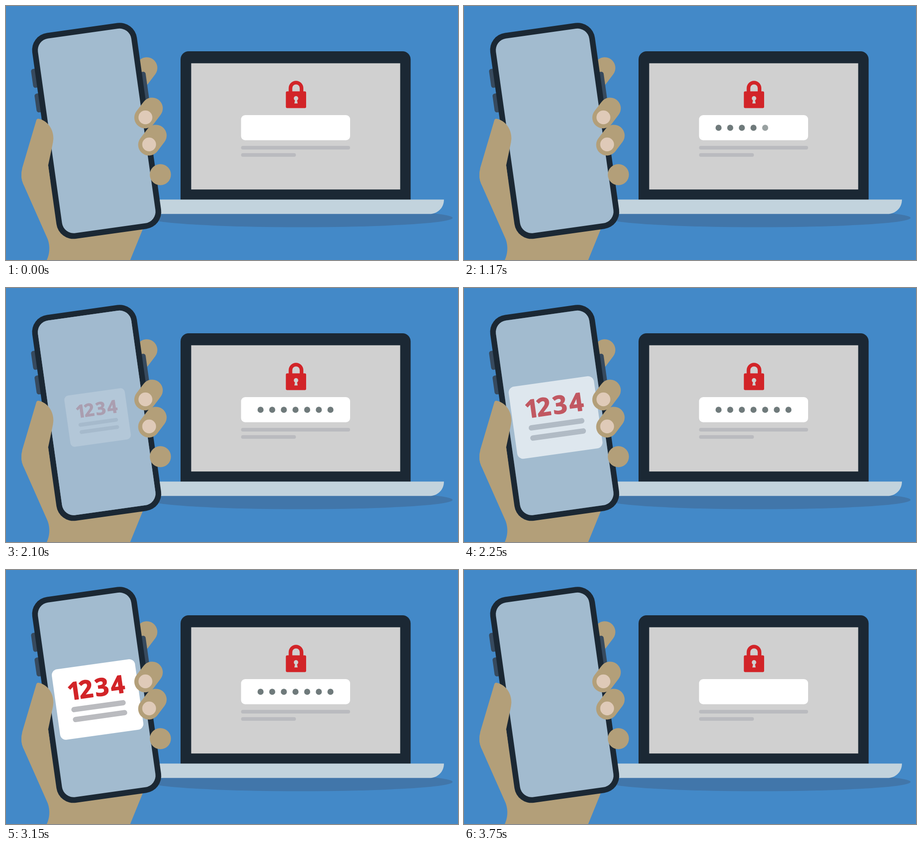
Write an HTML page with a canvas that moves like this. It is 997x561 px and loops after 3.78 s.

```html
<!DOCTYPE html>
<html lang="en">
<head>
<meta charset="utf-8">
<title>Passcode on phone</title>
<style>
  html, body { margin: 0; width: 100%; height: 100%; overflow: hidden; background: #4389c8; }
  canvas { display: block; }
</style>
</head>
<body>
<canvas id="stage" width="997" height="561"></canvas>
<script>
const ctx = document.getElementById('stage').getContext('2d');
const LOOP = 3780;
const TILT = -8 * Math.PI / 180;
const COLOR = {
  sky: '#4389c8', shadow: '#4176aa', dark: '#1b2834', base: '#c2d3dd', screen: '#d0d0d0',
  red: '#d22428', line: '#babbbf', dot: '#6f7a7b', skin: '#b39f79', nail: '#dfcab8',
  glass: '#a2bbcf', button: '#374a5e'
};

const clamp = v => Math.min(1, Math.max(0, v));
const progress = (t, start, length) => clamp((t - start) / length);
const backOut = p => 1 + 2.70158 * (p - 1) ** 3 + 1.70158 * (p - 1) ** 2;

function box(x, y, w, h, r, color) {
  ctx.fillStyle = color;
  ctx.beginPath();
  ctx.roundRect(x, y, w, h, r);
  ctx.fill();
}

const centeredBox = (x, y, w, h, r, color) => box(x - w / 2, y - h / 2, w, h, r, color);

function disc(x, y, r, color) {
  ctx.fillStyle = color;
  ctx.beginPath();
  ctx.arc(x, y, r, 0, 2 * Math.PI);
  ctx.fill();
}

function shape(path, color) {
  ctx.fillStyle = color;
  ctx.fill(new Path2D(path));
}

function finger(x, y) {
  ctx.strokeStyle = COLOR.skin;
  ctx.lineWidth = 47.2;
  ctx.lineCap = 'round';
  ctx.beginPath();
  ctx.moveTo(x, y);
  ctx.lineTo(x - 15.7, y + 20.6);
  ctx.stroke();
}

function tilted(x, y, draw) {
  ctx.save();
  ctx.translate(x, y);
  ctx.rotate(TILT);
  draw();
  ctx.restore();
}

function drawLock() {
  box(617.3, 188.5, 44.7, 37, 3, COLOR.red);
  ctx.strokeStyle = COLOR.red;
  ctx.lineWidth = 8;
  ctx.lineCap = 'butt';
  ctx.beginPath();
  ctx.moveTo(627.5, 190);
  ctx.arc(639.7, 181.4, 12.2, Math.PI, 0);
  ctx.lineTo(651.9, 190);
  ctx.stroke();
  disc(639.7, 204, 4.9, COLOR.screen);
  shape('M638 206 L636 215.3 H643.4 L641.4 206 Z', COLOR.screen);
}

function drawLaptop(dotsOut, t) {
  ctx.fillStyle = COLOR.shadow;
  ctx.beginPath();
  ctx.ellipse(650, 468, 335, 20.6, 0, 0, 2 * Math.PI);
  ctx.fill();
  box(385, 100, 507.5, 328, [18, 18, 0, 0], COLOR.dark);
  box(408.5, 126.5, 461, 278.7, 0, COLOR.screen);
  shape('M300 427.5 H966 C966 446 952 459.3 934 459.3 H300 Z', COLOR.base);
  drawLock();
  box(518.5, 241, 240.5, 55.5, 9, '#fff');
  box(518.5, 309, 240.5, 8, 4, COLOR.line);
  box(518.5, 325, 121, 8, 4, COLOR.line);
  for (let i = 0; i < 7; i++) {
    ctx.globalAlpha = progress(t, 220 + 220 * i, 100) * dotsOut;
    disc(561.5 + 25.7 * i, 269, 6.7, COLOR.dot);
  }
  ctx.globalAlpha = 1;
}

function drawCard(scale) {
  ctx.save();
  ctx.scale(scale, scale);
  centeredBox(0, 0, 185.3, 157.1, 13, '#fff');
  ctx.font = '700 54px "Open Sans", "Noto Sans", sans-serif';
  ctx.textAlign = 'center';
  ctx.lineJoin = 'round';
  ctx.lineWidth = 1.5;
  ctx.fillStyle = ctx.strokeStyle = COLOR.red;
  [-48.2, -22.5, 12.8, 48.3].forEach((x, i) => {
    ctx.fillText(i + 1, x, -7);
    ctx.strokeText(i + 1, x, -7);
  });
  centeredBox(0, 14.9, 121, 11.6, 5.8, COLOR.line);
  centeredBox(0.3, 37.1, 121, 11.6, 5.8, COLOR.line);
  ctx.restore();
}

const drawGlass = () => centeredBox(0, 0, 208, 434, 26, COLOR.glass);

function drawPhone(cardAlpha, cardScale) {
  tilted(200, 275.8, () => {
    box(-125, -155, 20, 42, 5, COLOR.button);
    box(-125, -100, 20, 42, 5, COLOR.button);
    box(104, -115, 20.5, 70, 5, COLOR.button);
    centeredBox(0, 0, 233, 459, 38, COLOR.dark);
    drawGlass();
  });
  if (cardAlpha === 0) return;
  tilted(202, 286, () => drawCard(cardScale));
  // Veiling the card with glass fades it as a single group.
  ctx.globalAlpha = 1 - cardAlpha;
  tilted(200, 275.8, drawGlass);
  ctx.globalAlpha = 1;
}

function drawScene(t) {
  const cardAlpha = progress(t, 2040, 325) * (1 - progress(t, 3300, 240));
  const cardScale = 0.47 + 0.53 * backOut(progress(t, 2040, 500));
  const dotsOut = 1 - progress(t, 3300, 195);

  box(0, 0, 997, 561, 0, COLOR.sky);
  drawLaptop(dotsOut, t);

  shape('M90 561 C96 548 98 532 92 515 L38 393 Q32 380 35 363 L93 352 L130 470 H311 L274 561 Z', COLOR.skin);
  finger(310.3, 136.8);
  drawPhone(cardAlpha, cardScale);
  shape('M38 393 Q31 378 36 357 L67 252 Q68.5 248 73 249.3 C92 254 105 272 104.5 293 Q104 301 102 309 L93 352 L98 390 L60 430 Z', COLOR.skin);
  finger(322.3, 226);
  disc(307.5, 246, 15.3, COLOR.nail);
  finger(330.8, 286);
  disc(315.7, 305.7, 15.2, COLOR.nail);
  disc(340.5, 372.5, 23.3, COLOR.skin);
}

function tick() {
  drawScene(performance.now() % LOOP);
  requestAnimationFrame(tick);
}
tick();
</script>
</body>
</html>
```
